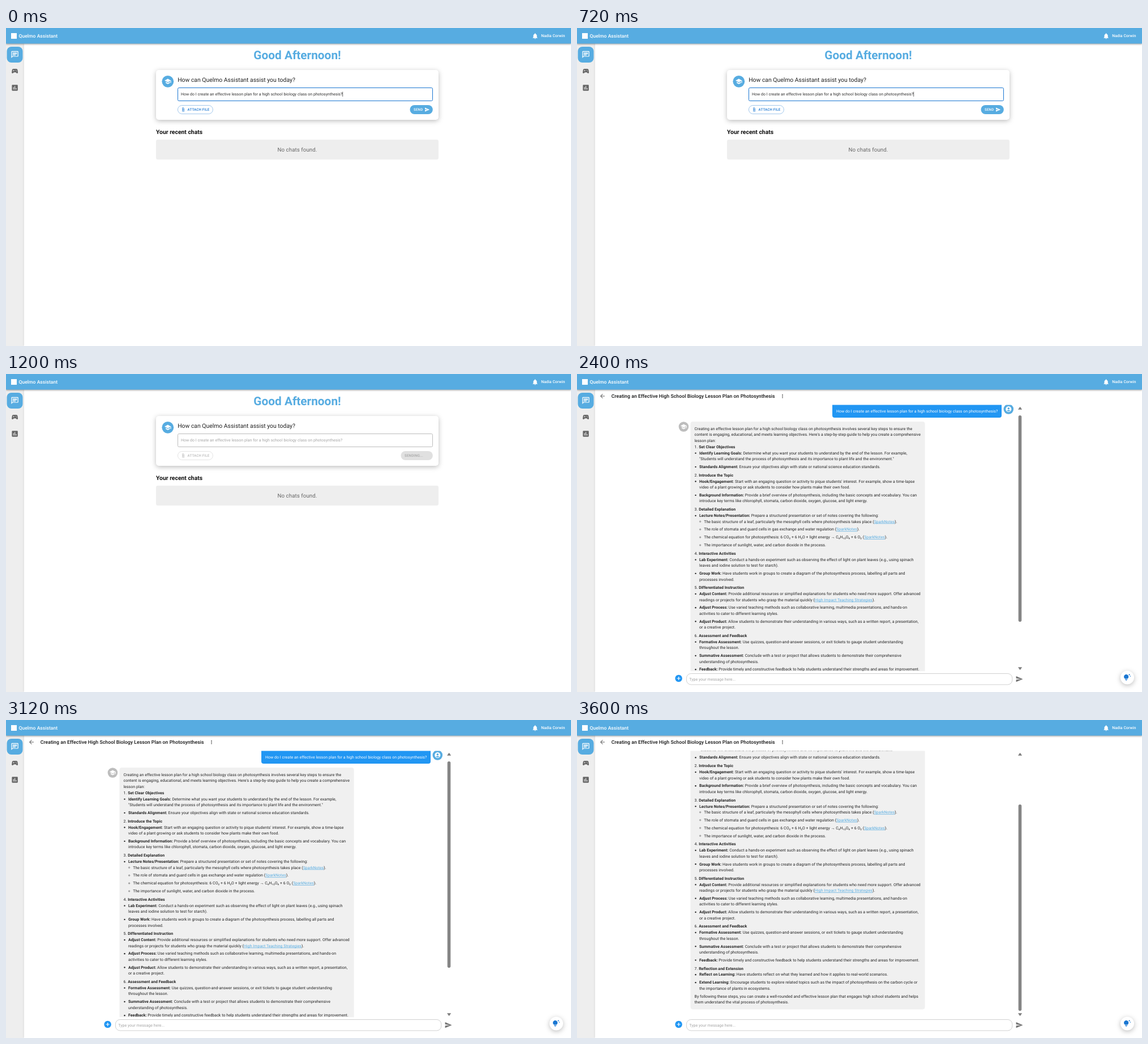
An HTML page for the animation above (4800 ms loop, 998x561 px).

```html
<!DOCTYPE html>
<html lang="en">
<head>
<meta charset="utf-8">
<title>Lesson plan chat</title>
<style>
html, body { margin: 0; width: 100%; height: 100%; overflow: hidden; background: #fff; }
svg { display: block; width: 998px; height: 561px; }
text { font: 6.93px Roboto, sans-serif; letter-spacing: .065px; fill: #212121; text-rendering: geometricPrecision; white-space: pre; }
.btn { font-size: 6.2px; font-weight: 500; letter-spacing: .17px; }
.bold { font-weight: 700; }
.link { fill: #57ace1; text-decoration: underline; }
.bar { filter: drop-shadow(0 1px 1.5px #0006); }
.side { filter: drop-shadow(.5px 0 1px #0005); }
.card { filter: drop-shadow(0 2px 4px #0004); }
</style>
</head>
<body>
<svg id="stage" viewBox="0 0 998 561"></svg>
<script>
const BLUE = '#57ace1', GREY = '#666';
const QUESTION = 'How do I create an effective lesson plan for a high school biology class on photosynthesis?';
const ICONS = {
  chat: 'M4 4h16v12H5.17L4 17.17V4m0-2c-1.1 0-1.99.9-1.99 2L2 22l4-4h14c1.1 0 2-.9 2-2V4c0-1.1-.9-2-2-2H4zm2 10h8v2H6v-2zm0-3h12v2H6V9zm0-3h12v2H6V6z',
  game: 'M21.58 16.09l-1.09-7.66C20.21 6.46 18.52 5 16.53 5H7.47C5.48 5 3.79 6.46 3.51 8.43l-1.09 7.66C2.2 17.63 3.39 19 4.94 19c.68 0 1.32-.27 1.8-.75L9 16h6l2.25 2.25c.48.48 1.13.75 1.8.75 1.56 0 2.75-1.37 2.53-2.91zM11 11H9v2H8v-2H6v-1h2V8h1v2h2v1zm4-1c-.55 0-1-.45-1-1s.45-1 1-1 1 .45 1 1-.45 1-1 1zm2 3c-.55 0-1-.45-1-1s.45-1 1-1 1 .45 1 1-.45 1-1 1z',
  chart: 'M19 3H5c-1.1 0-2 .9-2 2v14c0 1.1.9 2 2 2h14c1.1 0 2-.9 2-2V5c0-1.1-.9-2-2-2zM9 17H7v-7h2v7zm4 0h-2V7h2v10zm4 0h-2v-4h2v4z',
  bell: 'M12 22c1.1 0 2-.9 2-2h-4c0 1.1.89 2 2 2zm6-6v-5c0-3.07-1.64-5.64-4.5-6.32V4c0-.83-.67-1.5-1.5-1.5s-1.5.67-1.5 1.5v.68C7.63 5.36 6 7.92 6 11v5l-2 2v1h16v-1l-2-2z',
  school: 'M5 13.18v4L12 21l7-3.82v-4L12 17l-7-3.82zM12 3L1 9l11 6 9-4.91V17h2V9L12 3z',
  clip: 'M16.5 6v11.5c0 2.21-1.79 4-4 4s-4-1.79-4-4V5c0-1.38 1.12-2.5 2.5-2.5s2.5 1.12 2.5 2.5v10.5c0 .55-.45 1-1 1s-1-.45-1-1V6H10v9.5c0 1.38 1.12 2.5 2.5 2.5s2.5-1.12 2.5-2.5V5c0-2.21-1.79-4-4-4S7 2.79 7 5v12.5c0 3.04 2.46 5.5 5.5 5.5s5.5-2.46 5.5-5.5V6h-1.5z',
  send: 'M2.01 21L23 12 2.01 3 2 10l15 2-15 2z',
  back: 'M20 11H7.83l5.59-5.59L12 4l-8 8 8 8 1.41-1.41L7.83 13H20v-2z',
  more: 'M12 4a2 2 0 1 0 .01 0zm0 6a2 2 0 1 0 .01 0zm0 6a2 2 0 1 0 .01 0z',
  user: 'M12 2C6.48 2 2 6.48 2 12s4.48 10 10 10 10-4.48 10-10S17.52 2 12 2zm0 4c1.93 0 3.5 1.57 3.5 3.5S13.93 13 12 13s-3.5-1.57-3.5-3.5S10.07 6 12 6zm0 14c-2.03 0-4.43-.82-6.14-2.88C7.55 15.8 9.68 15 12 15s4.45.8 6.14 2.12C16.43 19.18 14.03 20 12 20z',
  add: 'M12 2C6.48 2 2 6.48 2 12s4.48 10 10 10 10-4.48 10-10S17.52 2 12 2zm5 11h-4v4h-2v-4H7v-2h4V7h2v4h4v2z',
  bulb: 'M7 20h4c0 1.1-.9 2-2 2s-2-.9-2-2zm-2-1h8v-2H5v2zm11.5-9.5c0 3.82-2.66 5.86-3.77 6.5H5.27c-1.11-.64-3.77-2.68-3.77-6.5C1.5 5.36 4.86 2 9 2s7.5 3.36 7.5 7.5zm4.87-2.13L20 8l1.37.63L22 10l.63-1.37L24 8l-1.37-.63L22 6l-.63 1.37zM19 6l.94-2.06L22 3l-2.06-.94L19 0l-.94 2.06L16 3l2.06.94L19 6z'
};

const icon = (name, x, y, scale, fill) =>
  `<path d="${ICONS[name]}" fill="${fill}" transform="translate(${x} ${y}) scale(${scale}) translate(-12 -12)"/>`;
const rect = (x, y, w, h, r, fill, more = '') =>
  `<rect x="${x}" y="${y}" width="${w}" height="${h}" rx="${r}" fill="${fill}" ${more}/>`;
const disc = (x, y, r, fill, more = '') => `<circle cx="${x}" cy="${y}" r="${r}" fill="${fill}" ${more}/>`;
const text = (x, y, str, style = '', cls = '') =>
  `<text x="${x}" y="${y}" class="${cls}" style="${style}">${str}</text>`;

// Line marks: # section, - bullet, o nested bullet, > continued bullet, = paragraph
const ANSWER = `=Creating an effective lesson plan for a high school biology class on photosynthesis involves several key steps to ensure the
=content is engaging, educational, and meets learning objectives. Here's a step-by-step guide to help you create a comprehensive
=lesson plan:
#Set Clear Objectives
-*Identify Learning Goals:* Determine what you want your students to understand by the end of the lesson. For example,
>"Students will understand the process of photosynthesis and its importance to plant life and the environment."
-*Standards Alignment:* Ensure your objectives align with state or national science education standards.
#Introduce the Topic
-*Hook/Engagement:* Start with an engaging question or activity to pique students' interest. For example, show a time-lapse
>video of a plant growing or ask students to consider how plants make their own food.
-*Background Information:* Provide a brief overview of photosynthesis, including the basic concepts and vocabulary. You can
>introduce key terms like chlorophyll, stomata, carbon dioxide, oxygen, glucose, and light energy.
#Detailed Explanation
-*Lecture Notes/Presentation:* Prepare a structured presentation or set of notes covering the following:
oThe basic structure of a leaf, particularly the mesophyll cells where photosynthesis takes place (_SparkNotes_).
oThe role of stomata and guard cells in gas exchange and water regulation (_SparkNotes_).
oThe chemical equation for photosynthesis: 6 CO₂ + 6 H₂O + light energy → C₆H₁₂O₆ + 6 O₂ (_SparkNotes_).
oThe importance of sunlight, water, and carbon dioxide in the process.
#Interactive Activities
-*Lab Experiment:* Conduct a hands-on experiment such as observing the effect of light on plant leaves (e.g., using spinach
>leaves and iodine solution to test for starch).
-*Group Work:* Have students work in groups to create a diagram of the photosynthesis process, labelling all parts and
>processes involved.
#Differentiated Instruction
-*Adjust Content:* Provide additional resources or simplified explanations for students who need more support. Offer advanced
>readings or projects for students who grasp the material quickly (_High Impact Teaching Strategies_).
-*Adjust Process:* Use varied teaching methods such as collaborative learning, multimedia presentations, and hands-on
>activities to cater to different learning styles.
-*Adjust Product:* Allow students to demonstrate their understanding in various ways, such as a written report, a presentation,
>or a creative project.
#Assessment and Feedback
-*Formative Assessment:* Use quizzes, question-and-answer sessions, or exit tickets to gauge student understanding
>throughout the lesson.
-*Summative Assessment:* Conclude with a test or project that allows students to demonstrate their comprehensive
>understanding of photosynthesis.
-*Feedback:* Provide timely and constructive feedback to help students understand their strengths and areas for improvement.
#Reflection and Extension
-*Reflect on Learning:* Have students reflect on what they learned and how it applies to real-world scenarios.
-*Extend Learning:* Encourage students to explore related topics such as the impact of photosynthesis on the carbon cycle or
>the importance of plants in ecosystems.
=By following these steps, you can create a well-rounded and effective lesson plan that engages high school students and helps
=them understand the vital process of photosynthesis.`;

function gap(prev, mark) {
  if (mark === '>' || prev === '=' && mark === '=') return 10.4;
  if (mark === '#') return prev === '=' ? 11.3 : 14.9;
  if (mark === '=') return 14;
  if (prev === '#') return 10.8;
  return mark === 'o' && prev === '-' ? 10.4 : 13.87;
}

function answer() {
  const left = { '=': 207.5, '#': 207.5, '-': 216, '>': 216, o: 224.2 };
  let y = 88.5, prev = '=', section = 0, out = '';
  for (const line of ANSWER.split('\n')) {
    const mark = line[0];
    y += gap(prev, mark);
    let str = line.slice(1);
    if (mark === '#') str = `${++section}. *${str}*`;
    if (mark === '-') out += disc(209.5, y - 2.2, 1.2, '#212121');
    if (mark === 'o') out += disc(217.6, y - 2.2, 1.1, 'none', 'stroke="#212121" stroke-width=".5"');
    str = str.replace(/\*(.+?)\*/g, '<tspan class="bold">$1</tspan>')
             .replace(/_(.+?)_/g, '<tspan class="link">$1</tspan>');
    out += text(left[mark], y.toFixed(2), str);
    prev = mark;
  }
  return out;
}

const frame = () =>
  rect(0, 27, 30.5, 534, 0, '#eee', 'class="side"') +
  rect(0, 0, 998, 27.5, 0, BLUE, 'class="bar"') +
  rect(9, 9, 10, 10, 0, '#fff') +
  text(22.5, 16.8, 'Quelmo Assistant', 'font-size:8.5px;font-weight:500;fill:#fff') +
  icon('bell', 934.6, 14.2, .52, '#fff') +
  text(987.5, 16.4, 'Nadia Corwin', 'font-weight:500;fill:#fff;text-anchor:end') +
  rect(1.5, 33, 28, 28, 8, BLUE) +
  icon('chat', 15.6, 46.9, .62, '#fff') +
  icon('game', 15.6, 76, .57, GREY) +
  icon('chart', 15.6, 105.5, .58, GREY);

function home(sending) {
  const c = sending
    ? { line: '#bdbdbd', text: '#a3a3a3', edge: '#dedede', attach: '#b8b8b8' }
    : { line: '#1976d2', text: '#2b2b2b', edge: '#8cbae8', attach: '#1976d2' };
  return text(514.5, 54.6, 'Good Afternoon!', `font-size:20.8px;font-weight:700;letter-spacing:0;text-anchor:middle;fill:${BLUE}`) +
    rect(265, 74, 499, 88, 5, '#fff', 'class="card"') +
    disc(285.8, 94.3, 10.4, BLUE) + icon('school', 285.8, 94.3, .52, '#fff') +
    text(303.2, 94.6, 'How can Quelmo Assistant assist you today?', 'font-size:10.4px;letter-spacing:0') +
    rect(303.5, 105.5, 450, 23, 2, '#fff', `stroke="${c.line}"`) +
    text(309, 119, QUESTION, `fill:${c.text}`) +
    (sending ? '' : rect(594.5, 112.5, .6, 8.5, 0, '#000')) +
    rect(303.4, 136.5, 62, 15, 7.5, '#fff', `stroke="${c.edge}" stroke-width=".8"`) +
    icon('clip', 313, 144, .36, c.attach) +
    text(320.6, 146.2, 'ATTACH FILE', `fill:${c.attach}`, 'btn') +
    (sending
      ? rect(697.5, 136, 56.3, 16, 8, '#e0e0e0') + text(704, 146.2, 'SENDING...', 'fill:#a6a6a6', 'btn')
      : rect(713.5, 136, 40.3, 16, 8, BLUE) + text(720, 146.2, 'SEND', 'fill:#fff', 'btn') +
        icon('send', 743.9, 144, .39, '#fff')) +
    text(265, 186.6, 'Your recent chats', 'font-size:10.4px;font-weight:700;letter-spacing:0;fill:#111') +
    rect(265, 197, 499, 35, 3, '#eee') +
    text(514.5, 217.6, 'No chats found.', 'font-size:9.7px;letter-spacing:.09px;text-anchor:middle;fill:#666');
}

const chat = () =>
  icon('back', 45, 39, .5, GREY) +
  text(60.7, 42.1, 'Creating an Effective High School Biology Lesson Plan on Photosynthesis', 'font-size:8.66px;font-weight:500;fill:#111') +
  icon('more', 363, 39, .42, '#555') +
  `<clipPath id="view"><rect x="170" y="54.6" width="606" height="469.6"/></clipPath>
  <g clip-path="url(#view)"><g id="log">` +
  rect(451, 50, 299, 27, 4, '#2196f3') +
  text(458, 67.6, QUESTION, 'fill:#fff') +
  disc(762.3, 62, 8.8, BLUE) + icon('user', 762.3, 62, .5, '#fff') +
  disc(188.4, 93, 8.8, '#bdbdbd') + icon('school', 188.4, 93, .5, '#fff') +
  rect(200.5, 84, 414, 524, 4, '#f0f0f0') + answer() + '</g></g>' +
  '<path d="M779 62.8h7.2l-3.6-5zM779 517.2h7.2l-3.6 5z" fill="#7c7c7c"/>' +
  rect(779.7, 73, 5.6, 364, 2.8, '#858585', 'id="thumb"') +
  icon('add', 179.6, 537, .62, '#2196f3') +
  rect(193.4, 528.5, 575.4, 19.5, 8, '#fff', 'stroke="#c4c4c4" stroke-width=".8"') +
  text(198.2, 540.9, 'Type your message here...', 'fill:#a2a2a2') +
  icon('send', 781.3, 538.2, .57, '#757575') +
  disc(972, 535.5, 12, '#fff', 'class="card"') + icon('bulb', 971.8, 535.4, .55, '#1976d2');

const $ = id => document.getElementById(id);
$('stage').innerHTML = frame() +
  `<g id="ask">${home(false)}</g><g id="wait">${home(true)}</g><g id="talk">${chat()}</g>`;

function draw() {
  const step = Math.floor(performance.now() % 4800 / 1200);
  const show = (id, on) => $(id).setAttribute('display', on ? 'inline' : 'none');
  show('ask', step === 0);
  show('wait', step === 1);
  show('talk', step > 1);
  const scrolled = step === 3;
  $('log').setAttribute('transform', `translate(0 ${scrolled ? -97.6 : 0})`);
  $('thumb').setAttribute('y', scrolled ? 149 : 73);
  requestAnimationFrame(draw);
}
draw();
</script>
</body>
</html>
```
